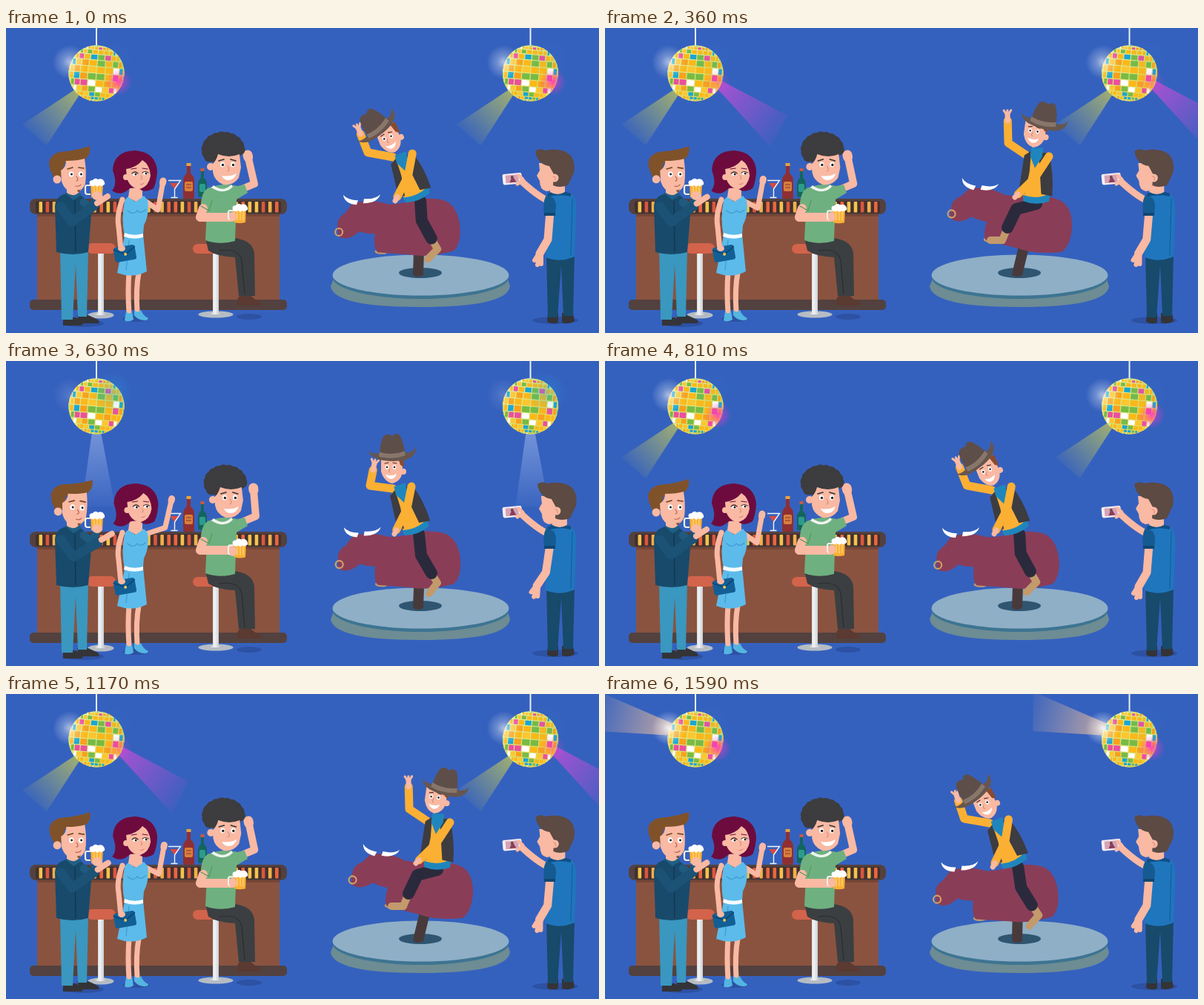
Recreate the animation shown at these times as an HTML page. Size 800x411 px, loop 1.62 s.

```html
<!DOCTYPE html>
<html lang="en">
<head>
<meta charset="utf-8">
<title>Bar night</title>
<style>
html, body { margin: 0; width: 100%; height: 100%; overflow: hidden; background: #3561be; }
svg { display: block; width: 800px; height: 411px; }
.limb { fill: none; stroke-linecap: round; stroke-linejoin: round; }
.skin { fill: #f9b9a3; }
.skinLine { stroke: #f9b9a3; }
.line { fill: none; stroke: #4a2c2a; stroke-width: 1.2; stroke-linecap: round; }
.shade { fill: #2d51a3; }
</style>
</head>
<body>
<svg viewBox="0 0 800 411" xmlns="http://www.w3.org/2000/svg">
<defs>
  <linearGradient id="chrome"><stop stop-color="#a9b0b8"/><stop offset=".45" stop-color="#f1f3f5"/><stop offset="1" stop-color="#9299a2"/></linearGradient>
  <linearGradient id="ballBase" x1="0" y1="0" x2="1" y2="1"><stop stop-color="#e6f0b4"/><stop offset=".5" stop-color="#d9e27a"/><stop offset="1" stop-color="#eccb4a"/></linearGradient>
  <clipPath id="ballClip"><circle r="38"/></clipPath>
  <g id="mug">
    <path d="M-8-4h-5q-2 0-2 3v6q0 3 3 3h4" fill="none" stroke="#f3f0e6" stroke-width="2.2"/>
    <path d="M-8-8H9L8 12Q0 14-7 12Z" fill="#fbb034"/>
    <path d="M-3-3v12M1-3v12M5-3v12" stroke="#fdd27a" stroke-width="1.4"/>
    <path d="M-9-5q-2-6 4-6 3-4 7-1 6-2 8 2 3 5-1 6-3 2-5 0-3 3-6 0-4 3-7-1Z" fill="#fff"/>
  </g>
</defs>
<g id="lights"></g>

<g id="bar">
  <rect x="42" y="248" width="327" height="122" fill="#8a5340"/>
  <rect x="42" y="251" width="327" height="3" fill="#784636"/>
  <rect x="32" y="366" width="347" height="14" rx="5" fill="#53413f"/>
  <rect x="32" y="230" width="347" height="21" rx="8" fill="#53413f"/>
  <g id="slats"></g>
  <path d="M244 183h5v13q5 4 5 10v22q0 2-2 2h-11q-2 0-2-2v-22q0-6 5-10Z" fill="#8f2f32"/>
  <path d="M243.500 182h6v4h-6Z" fill="#e9a23b"/><rect x="241" y="207" width="11" height="13" rx="2" fill="#d8803c"/><path d="M243 211h7M243 215h7" stroke="#8f2f32"/>
  <path d="M263 190h4v12q4 3 4 9v15q0 2-2 2h-8q-2 0-2-2v-15q0-6 4-9Z" fill="#14655e"/>
  <path d="M262.500 189h5v4h-5Z" fill="#c95a3c"/><rect x="261" y="210" width="8" height="11" rx="2" fill="#2c9b8c"/>
  <path d="M221 209h13l-6.500 8Z" fill="#d64b43"/>
  <path d="M219 205.500h16.500l-8 11.500v11M222.500 228.500h9" fill="none" stroke="#eef4fb" stroke-width="1.400"/>
</g>

<g id="stools">
  <ellipse cx="128" cy="387" rx="17.500" ry="4.500" fill="#b5bcc4"/>
  <path d="M124 304h8v78q1 3 7 5h-22q6-2 7-5Z" fill="url(#chrome)"/>
  <rect x="109" y="290" width="39" height="14" rx="7" fill="#d3634b"/>
  <ellipse cx="283" cy="386" rx="23.500" ry="4.500" fill="#b5bcc4"/>
  <path d="M279 302h8v81q2 3 8 3h-24q6 0 8-3Z" fill="url(#chrome)"/>
  <rect x="252" y="291" width="50" height="13" rx="6.500" fill="#d3634b"/>
</g>

<g id="seated">
  <ellipse class="shade" cx="328" cy="389" rx="17" ry="4"/>
  <path d="M314 362q8-4 16-2 2 5 13 8 2 6-2 6h-28q-3-5 1-12Z" fill="#5a3a31"/>
  <path d="M269 283H308Q333 286 335 304L336 361H314L309 309Q285 308 273 300Z" fill="#3b3f42"/>
  <path d="M288 300Q314 296 318 313L322 359" class="line" style="stroke:#2b2e31"/>
  <path id="waveArm" class="limb skinLine" stroke-width="10"/>
  <path id="waveFist" class="limb skinLine" stroke-width="13"/>
  <path d="M272 216Q292 208 312 213L322 211 326 222 311 231 309 287Q288 293 269 286L271 246 263 240Q263 222 272 216Z" fill="#6fb080"/>
  <path d="M280 212Q293 222 304 211L306 214Q294 226 277 215Z" fill="#eef5ee"/>
  <path class="limb skinLine" stroke-width="12" d="M266 243L262 255 304 255"/>
  <path d="M263 240L274 246 278 232" class="line" style="stroke:#579a5b"/>
  <g id="seatMug"><use href="#mug" transform="translate(315 250)"/><ellipse class="skin" cx="306" cy="254" rx="5" ry="6.500"/></g>
  <g id="seatHead">
    <g id="afro" fill="#3d3c3e"></g>
    <path class="skin" d="M279 183Q284 178 286 170 301 176 315 170L317 188 314 202Q306 213 293 211 281 206 279 194Z"/>
    <circle class="skin" cx="276" cy="187" r="5"/>
    <ellipse cx="292" cy="184" rx="3" ry="3.500" fill="#fff"/><ellipse cx="306" cy="184" rx="3" ry="3.500" fill="#fff"/>
    <circle cx="292.500" cy="184.500" r="1.700" fill="#222"/><circle cx="306.500" cy="184.500" r="1.700" fill="#222"/>
    <path d="M287 179l7-2M303 177l7 2" class="line" style="stroke-width:1.700;stroke:#333"/>
    <path d="M299 186q4 5 0 7" class="line" style="stroke:#db8d79"/>
    <path d="M291 199Q302 201 311 196 308 205 300 205 294 205 291 199Z" fill="#fff"/>
  </g>
</g>

<g id="lady">
  <ellipse class="shade" cx="175" cy="392" rx="18" ry="4"/>
  <path id="ladyArm" class="limb skinLine" stroke-width="7"/>
  <path id="ladyFist" class="limb skinLine" stroke-width="9"/>
  <path class="limb skinLine" stroke-width="7" d="M166 330Q164 354 166 384M179 330Q175 352 177 382"/>
  <path d="M162 382q4 5 8 0l2 11q-7 4-12 1ZM173 380q5 5 9 0 3 8 10 11 0 3-5 3-9 0-14-7Z" fill="#54b5e2"/>
  <path d="M160 232L165 227 174 234 186 226 191 232Q194 251 186 266L185 278 190 328Q171 338 150 330L160 280Q155 257 160 232Z" fill="#5cbbea"/>
  <path class="skin" d="M167 214H184L184 228 175 234 165 228Z"/>
  <path d="M160 276Q172 281 185 277V282Q172 286 159 281Z" fill="#f5fbff"/>
  <path d="M164 246q8 7 13 0 5 5 11-1M166 286l-4 40" class="line" style="stroke:#3e9bd0"/>
  <path class="limb skinLine" stroke-width="7" d="M157 231Q149 252 152 268L155 299"/>
  <g transform="rotate(-10 160 304)"><rect x="146" y="294" width="29" height="20" rx="3" fill="#125f96"/><path d="M146 297l15 8 14-8" class="line" style="stroke:#0b416c"/><circle cx="161" cy="305" r="2" fill="#e8c65a"/></g>
  <ellipse class="skin" cx="156" cy="297" rx="5" ry="4"/>
  <g id="ladyHead">
    <path d="M143 219Q151 211 144 192 145 166 174 165 202 167 204 193 203 208 199 216 186 224 178 215L167 216Q155 228 143 219Z" fill="#6d0b3e"/>
    <path class="skin" d="M162 190Q176 188 184 178 194 184 195 199 193 213 181 217 167 216 163 202Z"/>
    <circle class="skin" cx="162" cy="201" r="4"/>
    <ellipse cx="174" cy="197" rx="3.500" ry="2" fill="#fff"/><ellipse cx="188" cy="196" rx="3.500" ry="2" fill="#fff"/>
    <circle cx="175" cy="197" r="1.500" fill="#222"/><circle cx="189" cy="196" r="1.500" fill="#222"/>
    <path d="M170 196q4-4 8 0M184 195q4-3 8 0" class="line"/>
    <path d="M169 190l7-1M184 189l7 1" class="line" style="stroke:#6d0b3e"/>
    <path d="M178 209q5 3 9-1-3 5-9 1Z" fill="#c72f51"/>
    <path d="M182 199q3 4 0 5" class="line" style="stroke:#db8d79"/>
  </g>
</g>

<g id="drinker">
  <ellipse class="shade" cx="104" cy="398" rx="28" ry="5"/>
  <path d="M77 390h17l9 5q2 6-3 6H77ZM96 387h15l13 6q4 5-1 5H99Z" fill="#343438"/>
  <path d="M73 298H111L109 389H97L94 318 90 393H75Z" fill="#3a97bf"/>
  <path d="M78 224Q92 220 103 227L116 240 111 302Q90 308 68 302L66 240Q67 228 78 224Z" fill="#184a6b"/>
  <path d="M79 222L91 232 102 225 98 221Z" fill="#205f86"/>
  <path d="M93 233L94 302" class="line" style="stroke:#10354f"/>
  <path class="limb" d="M105 235L114 242 121 234" stroke="#205a7e" stroke-width="11"/>
  <path class="skin" d="M82 207h17v14q-8 8-17 1Z"/>
  <g id="drinkHead">
    <path d="M65 202Q58 191 58 181 61 166 84 166 101 163 113 159 115 172 105 178L79 182 74 201Z" fill="#80522a"/>
    <path class="skin" d="M74 192Q81 188 81 179 97 179 106 176 109 194 107 210 102 222 91 223 79 219 75 207Z"/>
    <circle class="skin" cx="69" cy="204" r="5.500"/>
    <ellipse cx="88" cy="197" rx="3.200" ry="3.700" fill="#fff"/><ellipse cx="101" cy="197" rx="3.200" ry="3.700" fill="#fff"/>
    <circle cx="88.500" cy="197" r="1.500" fill="#222"/><circle cx="101.500" cy="197" r="1.500" fill="#222"/>
    <path d="M83 190l7-2M98 188l7 1" class="line" style="stroke:#704522;stroke-width:1.700"/>
    <path d="M95 200q4 5 0 6M94 213q5 1 7-2" class="line" style="stroke:#b5654f"/>
    <path d="M96 218q3 1 5-1l-2 4h-2Z" fill="#80522a"/>
  </g>
  <use href="#mug" transform="translate(122 216)"/>
  <ellipse class="skin" cx="123" cy="226" rx="7" ry="6"/>
  <path id="clapArm" class="limb" stroke="#1c5276" stroke-width="13"/>
  <path id="clapHand" class="limb skinLine" stroke-width="8"/>
</g>

<g id="stage">
  <path d="M443 335L438 348Q442 376 559 376 676 376 680 348L676 335Z" fill="#6d8c93"/>
  <ellipse cx="559.500" cy="336" rx="119" ry="29" fill="#3d7492"/>
  <ellipse cx="559.500" cy="333" rx="119" ry="27.500" fill="#8fafc7"/>
  <ellipse cx="559" cy="330" rx="29" ry="7" fill="#2f5571"/>
  <path id="pole" class="limb" stroke="#483a3b" stroke-width="14" style="stroke-linecap:butt"/>
  <ellipse cx="556" cy="332" rx="7" ry="3" fill="#483a3b"/>
</g>
<path id="farArm" class="limb" stroke="#fbb034" stroke-width="11"/>
<path id="farHand" class="limb skinLine" stroke-width="7"/>
<path id="fingers" class="limb skinLine" stroke-width="3"/>
<g id="bull">
  <ellipse cx="506" cy="302" rx="9" ry="3.500" fill="#c29a6b"/>
  <path d="M447 271Q444 258 457 250L466 238 477 235Q497 232 514 238 535 238 551 231 577 228 592 233 607 240 611 262 615 288 604 300 572 310 545 306L501 303Q495 300 497 278 484 278 476 275 462 288 450 283 446 279 447 271Z" fill="#8a3d57"/>
  <path d="M454 226Q460 233 474 233L472 239Q456 238 454 226ZM481 237L482 231Q497 232 504 225 500 237 481 237Z" fill="#fff"/>
  <circle cx="448.500" cy="276" r="5" fill="none" stroke="#d39f63" stroke-width="2.200"/>
</g>
<g id="rider">
  <path id="boot" class="limb" stroke="#c29a6b" stroke-width="10"/>
  <path id="leg" class="limb" stroke="#2b2a3d" stroke-width="16"/>
  <g id="torso">
    <path d="M-14-54Q0-60 16-54L20-8Q4 4-16-3Z" fill="#fbb034"/>
    <path d="M-16-7Q2-2 20-10L19-1Q2 5-16 0Z" fill="#1f86bd"/>
    <path d="M-17-52L-8-57-9-34-14-8-22-14ZM2-57L16-55Q24-34 23-7L8-9Z" fill="#3d3c40"/>
    <path d="M-8-61L8-61 7-51-2-38-9-51Z" fill="#1f86bd"/>
  </g>
  <g id="face">
    <path class="skin" d="M-14-20H14L15 0Q14 15 1 18-10 16-14 2Z"/>
    <path d="M8-20h8l1 16-5-3Z" fill="#8a4a2d"/>
    <circle class="skin" cx="16" cy="2" r="4"/>
    <ellipse cx="-6" cy="-4" rx="2.400" ry="2.900" fill="#fff"/><ellipse cx="4" cy="-4" rx="2.400" ry="2.900" fill="#fff"/>
    <circle cx="-6" cy="-4" r="1.300" fill="#222"/><circle cx="4" cy="-4" r="1.300" fill="#222"/>
    <path d="M-9-9l5-1M2-10l5 1" class="line"/>
    <path d="M-2-2q-3 4 0 5" class="line" style="stroke:#db8d79"/>
    <path d="M-8 6Q0 9 7 5 5 12-1 12-6 11-8 6Z" fill="#fff"/>
  </g>
  <g id="hat">
    <path d="M-32-8Q-30-2-17-3L17-3Q28-2 32-10 33 2 18 7 0 10-19 5-31 0-32-8Z" fill="#67564e"/>
    <path d="M-17 0Q-15-25-8-28-2-29 1-26 6-31 11-27 16-18 18 0 0 6-17 0Z" fill="#5e4e49"/>
    <path d="M-17-5Q0 1 17-5L18 1Q0 7-18 1Z" fill="#89766b"/>
  </g>
  <path id="nearArm" class="limb" stroke="#fbb034" stroke-width="11"/>
  <path id="nearHand" class="limb skinLine" stroke-width="7"/>
</g>

<g id="filmer">
  <ellipse class="shade" cx="741" cy="394" rx="31" ry="5"/>
  <path d="M731 384h14v13q-8 3-15-1ZM750 384h15l2 11q-8 5-17 2Z" fill="#343438"/>
  <path d="M729 304H767L765 388H752L749 320 744 390H731Z" fill="#184a6b"/>
  <path class="limb skinLine" stroke-width="9" d="M732 233Q716 226 694 205"/>
  <path d="M728 226Q745 217 763 224 770 229 769 248L767 308Q748 317 728 309Z" fill="#1f76bd"/>
  <path d="M731 223Q746 216 762 223L762 227Q746 223 730 228Z" fill="#105084"/>
  <path d="M764 230L762 306" class="line" style="stroke:#155f9d"/>
  <g id="downArm">
    <path class="limb skinLine" stroke-width="11" d="M734 247L731 285 720 304"/>
    <path class="limb skinLine" stroke-width="6" d="M720 302L713 313M721 305L717 319M722 306L722 318"/>
  </g>
  <path d="M728 227Q742 225 742 241L741 252H726Q724 235 728 227Z" fill="#155b91"/>
  <path d="M726 249h15v4h-15Z" fill="#0f4672"/>
  <g transform="rotate(-5 683 203)">
    <rect x="670" y="196" width="26" height="14.500" rx="2.500" fill="#f7eef2"/>
    <rect x="674" y="198" width="17.500" height="10.500" fill="#d6a3b6"/>
    <circle cx="683" cy="201" r="2" fill="#674a45"/><path d="M679 208l3-6h3l3 6Z" fill="#8a3d57"/>
  </g>
  <path class="limb skinLine" stroke-width="5" d="M690 210L696 206M692 199L697 204"/>
  <g id="filmHead">
    <path class="skin" d="M734 202h20v19q-10 6-20 0Z"/>
    <path class="skin" d="M719 182H748L752 207Q741 220 729 220 720 218 720 206L716 199 720 192Z"/>
    <path d="M714 166Q720 161 727 165 748 161 760 170 769 179 766 195L758 212Q746 216 738 212L739 197 733 186Q717 184 714 166Z" fill="#5c4a43"/>
    <circle class="skin" cx="740" cy="202" r="5.500"/>
    <path d="M738 200q4 0 3 5" class="line" style="stroke:#db8d79"/>
  </g>
</g>
</svg>
<script>
const LOOP = 810, STEP = 30;
const $ = id => document.getElementById(id);
const set = (id, d) => $(id).setAttribute('d', d);
const move = (id, v) => $(id).setAttribute('transform', v);
const lerp = (a, b, k) => a + (b - a) * k;

// Beams: [name, colour, opacity, axis, polygon, on windows]
const beams = [
  ['gold', '#c0c65c', .75, [97, 87, 35, 145], '93,83 99,90 55,158 22,130', [[0, 90], [330, 540]]],
  ['violet', '#bb4fd6', .85, [152, 75, 240, 142], '150,80 157,71 246,118 224,161', [[270, 450]]],
  ['azure', '#2b9be6', .75, [157, 56, 243, 38], '156,54 156,60 243,62 236,14', [[90, 270]]],
  ['pale', '#c9d8ff', .42, [122, 97, 125, 195], '116,96 128,96 147,196 102,196', [[480, 720]]],
  ['peach', '#edbd9d', .75, [92, 48, -14, 22], '92,40 92,56 -8,50 -8,-3', [[720, 810]]]
];
const glows = [['white', '#fff', 86, 46, 23], ['pink', '#ff35c8', 152, 73, 18], ['blue', '#16b4f4', 143, 43, 28]];
const isOn = (spans, t) => spans.some(([a, b]) => t >= a && t < b);

function ballTiles() {
  const colors = ['#fcb817', '#fcb817', '#ec4f9d', '#fdc62e', '#18a6d3', '#77bb45', '#fff', '#f7a21c'];
  const rad = Math.PI / 180;
  let out = '', seed = 7;
  for (let lat = -84; lat < 84; lat += 14) {
    const y = 38 * Math.sin(lat * rad), h = 38 * Math.sin((lat + 14) * rad) - y;
    const r = 38 * Math.cos((lat + 7) * rad);
    for (let lon = -90; lon < 90; lon += 18) {
      seed = (seed * 16807) % 2147483647;
      const x = r * Math.sin(lon * rad), w = r * Math.sin((lon + 18) * rad) - x;
      out += `<rect x="${x + .6}" y="${y + .6}" width="${Math.max(.4, w - 1.2)}" height="${h - 1.2}" fill="${colors[(seed >> 8) % 8]}"/>`;
    }
  }
  return `<g clip-path="url(#ballClip)" transform="rotate(5)"><circle r="38" fill="url(#ballBase)"/>${out}</g>`;
}

function buildLights() {
  let defs = '', rays = '', halos = '';
  for (const [id, c, o, [x1, y1, x2, y2], pts] of beams) {
    defs += `<linearGradient id="${id}" gradientUnits="userSpaceOnUse" x1="${x1}" y1="${y1}" x2="${x2}" y2="${y2}"><stop stop-color="${c}" stop-opacity="${o}"/><stop offset="1" stop-color="${c}" stop-opacity=".04"/></linearGradient>`;
    rays += `<polygon class="${id}" points="${pts}" fill="url(#${id})"/>`;
  }
  for (const [id, c, x, y, r] of glows) {
    defs += `<radialGradient id="${id}"><stop stop-color="${c}" stop-opacity=".85"/><stop offset=".4" stop-color="${c}" stop-opacity=".4"/><stop offset="1" stop-color="${c}" stop-opacity="0"/></radialGradient>`;
    halos += `<circle class="${id}" cx="${x}" cy="${y}" r="${r}" fill="url(#${id})"/>`;
  }
  const lamp = x => `<g transform="translate(${x})"><path d="M122 0V25" stroke="#e8eefb" stroke-width="2"/>${rays}<g transform="translate(122 61)">${ballTiles()}</g>${halos}</g>`;
  $('lights').innerHTML = `<defs>${defs}</defs>` + lamp(0) + lamp(585.5);
}

function buildDetails() {
  const tones = ['#f4c34d', '#e9663f', '#f0b04a', '#d9573d'];
  let slats = '<rect x="40" y="233" width="331" height="16.500" rx="3" fill="#41302f"/>';
  let curls = '<ellipse cx="293" cy="164" rx="25" ry="20"/>';
  for (let i = 0; i < 36; i++)
    slats += `<rect x="${44.5 + i * 9.1}" y="234" width="4.6" height="14.500" rx="1" fill="${tones[(i * 3 + (i >> 2)) % 4]}"/>`;
  for (let i = 0; i < 12; i++) {
    const a = Math.PI * (.82 + i * .107);
    curls += `<circle cx="${293 + 22 * Math.cos(a)}" cy="${164 + 17 * Math.sin(a)}" r="7.5"/>`;
  }
  $('slats').innerHTML = slats;
  $('afro').innerHTML = curls;
}

// Rider poses at each key time, joints as x, y pairs
const times = [-15, 180, 360, 510, 630];
const poses = {
  bull: [[0], [8.4], [10.2], [4], [.7]],
  hat: [[500, 136, -42], [567, 131, -1], [591, 128, 13], [545, 128, 2], [521, 127, -2]],
  face: [[515, 151, -22], [566, 147, 2], [579, 143, 8], [541, 147, 3], [520, 147, 0]],
  torso: [[531, 172, 553, 230], [575, 169, 577, 232], [583, 165, 580, 234], [548, 170, 565, 230], [532, 170, 553, 230]],
  far: [[520, 174, 486, 168, 474, 135], [560, 172, 532, 163, 515, 129], [568, 171, 544, 155, 543, 116], [537, 171, 508, 163, 513, 126], [522, 172, 491, 168, 497, 138]],
  near: [[546, 169, 541, 199, 524, 233], [591, 172, 572, 206, 546, 230], [599, 173, 580, 202, 553, 228], [560, 171, 551, 204, 535, 232], [547, 169, 541, 199, 524, 233]],
  leg: [[558, 233, 561, 260, 575, 284], [580, 237, 554, 247, 550, 276], [582, 237, 555, 244, 543, 269], [567, 233, 557, 256, 573, 282], [557, 233, 560, 262, 574, 286]],
  foot: [[584, 298, 571, 312], [545, 298, 528, 301], [536, 286, 520, 286], [582, 296, 570, 308], [582, 299, 571, 313]]
};

function sample(keys, t) {
  const n = times.length;
  if (t >= LOOP - 15) t -= LOOP;
  let i = n - 1;
  while (times[i] > t) i--;
  const at = k => times[(k + n) % n] + LOOP * Math.floor(k / n);
  const val = (k, c) => keys[(k + n) % n][c];
  const h = at(i + 1) - at(i), u = (t - at(i)) / h;
  const slope = (k, c) => (val(k + 1, c) - val(k - 1, c)) / (at(k + 1) - at(k - 1)) * h;
  return keys[0].map((_, c) => {
    const a = val(i, c), b = val(i + 1, c), ma = slope(i, c), mb = slope(i + 1, c);
    return a + u * (ma + u * (3 * (b - a) - 2 * ma - mb + u * (2 * (a - b) + ma + mb)));
  });
}

const path = p => 'M' + p.map(v => v.toFixed(2)).join(' ');

// Last stretch of a limb, from len before the hand to the hand
function handTip([, , ex, ey, hx, hy], len) {
  const k = len / Math.hypot(hx - ex, hy - ey);
  return [lerp(hx, ex, k), lerp(hy, ey, k), hx, hy];
}

function drawFingers(arm) {
  const [x, y, hx, hy] = handTip(arm, 1);
  const ux = hx - x, uy = hy - y;
  set('fingers', [-.8, 0, .8].map(o => path([hx - uy * o * 2, hy + ux * o * 2, hx + ux * 5 - uy * o * 6, hy + uy * 5 + ux * o * 6])).join(''));
}

function drawRider(t) {
  const p = {};
  for (const k in poses) p[k] = sample(poses[k], t);
  const [a] = p.bull;
  move('bull', `rotate(${a} 601 370)`);
  set('pole', path([556, 332, 557 + a * .9, 290]));
  for (const id of ['hat', 'face']) move(id, `translate(${p[id][0]} ${p[id][1]}) rotate(${p[id][2]})`);
  const [nx, ny, hx, hy] = p.torso;
  const lean = Math.atan2(nx - hx, hy - ny) * 180 / Math.PI;
  move('torso', `translate(${hx} ${hy}) rotate(${lean}) scale(1 ${Math.hypot(nx - hx, ny - hy) / 58})`);
  for (const [id, len] of [['far', 9], ['near', 6]]) {
    const tip = handTip(p[id], len);
    set(id + 'Arm', path([...p[id].slice(0, 4), tip[0], tip[1]]));
    set(id + 'Hand', path(tip));
  }
  drawFingers(p.far);
  set('leg', path(p.leg));
  set('boot', path([p.leg[4], p.leg[5], ...p.foot]));
}

function drawCrowd(t) {
  const s = (1 - Math.cos(t / 405 * 2 * Math.PI)) / 2;
  const mix = (a, b) => a.map((v, i) => lerp(v, b[i], s));
  const raise = (id, arm) => {
    set(id + 'Arm', path(arm));
    set(id + 'Fist', path(handTip(arm, 3)));
  };
  set('clapArm', path(mix([74, 241, 89, 261, 119, 239], [74, 241, 91, 264, 124, 245])));
  set('clapHand', path(mix([123, 236, 137, 227], [129, 241, 143, 233])));
  raise('lady', mix([189, 234, 205, 245, 212, 206], [189, 233, 215, 224, 224, 185]));
  raise('wave', mix([316, 218, 335, 210, 326, 171], [316, 218, 337, 209, 334, 171]));
  move('drinkHead', `rotate(${s * 3.500} 88 225)`);
  move('ladyHead', `translate(${s * 1.500})`);
  move('seatHead', `translate(${s * 3})`);
  move('seatMug', `translate(0 ${s * 2.500})`);
  move('filmHead', `translate(${s * 3})`);
  move('downArm', `rotate(${s * 4} 734 247)`);
}

function drawLights(t) {
  const on = {};
  const show = (id, o) => document.querySelectorAll('#lights .' + id).forEach(e => e.style.opacity = o);
  for (const b of beams) {
    on[b[0]] = isOn(b[5], t);
    show(b[0], on[b[0]] ? 1 : 0);
  }
  show('white', on.peach ? 1 : on.gold ? .7 : .2);
  show('pink', isOn([[0, 90], [720, 810]], t) ? 1 : on.violet ? .45 : 0);
  show('blue', on.azure ? 1 : on.pale ? .4 : .08);
}

buildLights();
buildDetails();
const start = performance.now();
function draw() {
  const t = Math.floor((performance.now() - start) / STEP) * STEP % LOOP;
  drawLights(t);
  drawCrowd(t);
  drawRider(t);
  requestAnimationFrame(draw);
}
draw();
</script>
</body>
</html>
```
